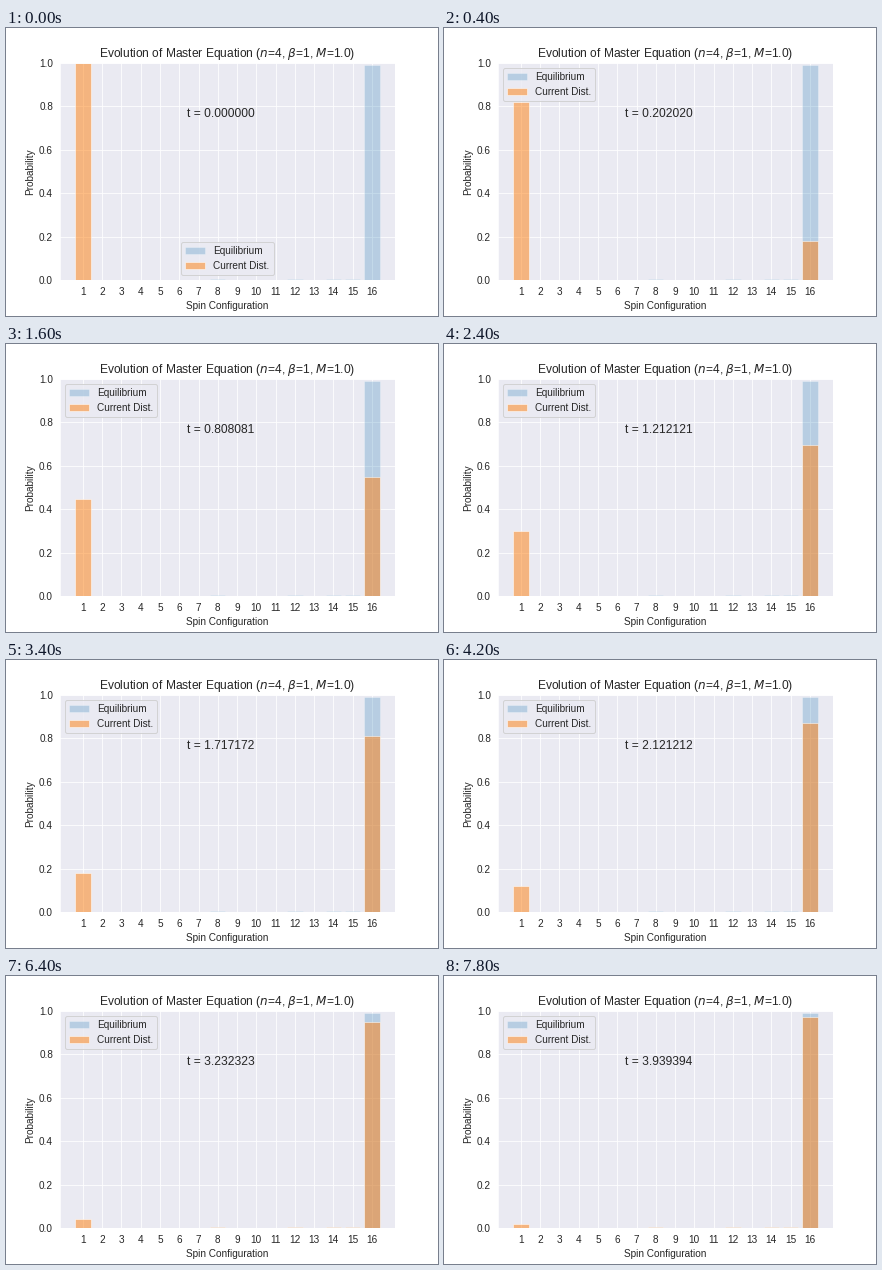
A matplotlib script that plays this animation: 432 by 288 pixels, repeating every 8 s.

```python
import itertools

import matplotlib.pyplot as plt
import numpy as np
from matplotlib.animation import FuncAnimation

N, BETA, FIELD = 4, 1, 1.0
FRAMES, INTERVAL = 40, 200
TIMES = np.linspace(0, 10, 100)

plt.rcParams.update({
    "font.family": "Liberation Sans",
    "font.size": 10,
    "text.color": ".15",
    "axes.labelcolor": ".15",
    "axes.facecolor": "#EAEAF2",
    "axes.edgecolor": "white",
    "axes.grid": True,
    "axes.axisbelow": True,
    "grid.color": "white",
    "grid.linestyle": "-",
    "xtick.color": ".15",
    "ytick.color": ".15",
    "xtick.bottom": False,
    "ytick.left": False,
    "patch.edgecolor": "w",
    "patch.force_edgecolor": True,
})


def equilibrium():
    """Boltzmann weights of a periodic Ising chain in a field."""
    spins = np.array(list(itertools.product([-1, 1], repeat=N)))
    energy = -(spins * np.roll(spins, 1, axis=1)).sum(axis=1) - FIELD * spins.sum(axis=1)
    weights = np.exp(-BETA * energy)
    return weights / weights.sum()


eq = equilibrium()
start = np.zeros(2**N)
start[0] = 1
states = np.arange(1, 2**N + 1)


def distribution(t):
    return eq + (start - eq) * np.exp(-t)


fig, ax = plt.subplots(figsize=(6, 4), dpi=72)
fig.subplots_adjust(left=0.125, right=0.9, bottom=0.125, top=0.88)
ax.bar(states, eq, color="C0", alpha=0.25, label="Equilibrium")
bars = ax.bar(states, start, color="C1", alpha=0.5, label="Current Dist.")
ax.set_ylim(0, 1)
ax.set_xticks(states)
ax.set_yticks(np.linspace(0, 1, 6))
ax.set_xlabel("Spin Configuration")
ax.set_ylabel("Probability")
ax.set_title(rf"Evolution of Master Equation ($n$={N}, $\beta$={BETA}, $M$={FIELD})")
clock = ax.text(0.4 * 2**N, 0.75, "", fontsize=12)
legend = ax.legend(loc="lower center")


def update(i):
    t = TIMES[i]
    p = distribution(t)
    for bar, height in zip(bars, p):
        bar.set_height(height)
    clock.set_text(f"t = {t:.6f}")
    # the legend sits in the corner once the first bar is below it
    legend.set_loc("lower center" if p[0] > 0.83 else "upper left")
    return [*bars, clock, legend]


anim = FuncAnimation(fig, update, frames=FRAMES, interval=INTERVAL,
                     repeat=True, repeat_delay=0, blit=False)
plt.show()
```
